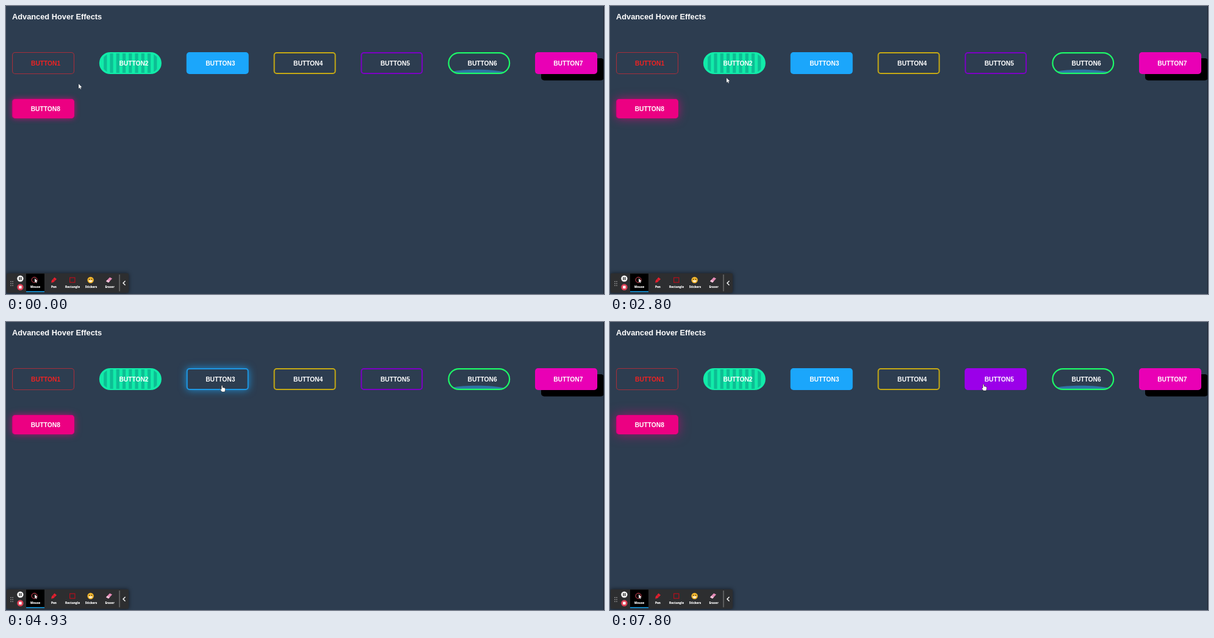
An HTML page with a canvas that plays this animation: 980x474 px, repeating every 8 s.

```html
<!DOCTYPE html>
<html lang="en">
<head>
<meta charset="utf-8">
<title>Advanced Hover Effects</title>
<style>
  html, body { margin: 0; width: 100%; height: 100%; overflow: hidden; background: #2d3d50; }
  canvas { display: block; width: 980px; height: 474px; }
</style>
</head>
<body>
<canvas id="stage"></canvas>
<script>
const W = 980, H = 474, LOOP = 8000, FADE = 300;
const BG = '#2d3d50', SANS = '"Liberation Sans", Arial, sans-serif';
const canvas = document.getElementById('stage');
const ctx = canvas.getContext('2d');
const ratio = window.devicePixelRatio || 1;
canvas.width = W * ratio;
canvas.height = H * ratio;

// Pointer path: time, x, y
const PATH = [
  [0, 119, 128], [350, 119, 128], [800, 93, 103], [1130, 91, 100], [1550, 91, 100],
  [1950, 127, 127], [2060, 128, 128], [2500, 150, 136], [2950, 205, 112],
  [3250, 212, 101], [3600, 215, 98], [3950, 220, 102], [4300, 285, 132],
  [4650, 349, 108], [4930, 354, 104], [5250, 356, 106], [5550, 420, 137],
  [5950, 488, 100], [6200, 492, 96], [6550, 492, 96], [7050, 550, 134],
  [7450, 606, 106], [7800, 612, 102], [8000, 612, 102]
];

// Time spans in which buttons 1 to 5 are hovered
const HOVERS = [[550, 1750], [2950, 4080], [4580, 5350], [5800, 6750], [7330, 9000]];

const clamp = v => Math.max(0, Math.min(1, v));
const smooth = v => v * v * (3 - 2 * v);
const left = i => 10 + 142.85 * i;

function hover(i, t) {
  const [start, end] = HOVERS[i];
  return smooth(clamp((t - start) / FADE)) * (1 - smooth(clamp((t - end) / FADE)));
}

function pointerAt(t) {
  const i = PATH.findIndex(p => p[0] > t);
  const a = PATH[i - 1], b = PATH[i];
  const k = smooth((t - a[0]) / (b[0] - a[0]));
  return [a[1] + (b[1] - a[1]) * k, a[2] + (b[2] - a[2]) * k];
}

function rounded(x, y, w, h, r) {
  ctx.beginPath();
  ctx.roundRect(x, y, w, h, r);
}

function fillBox(x, y, w, h, r, color, alpha = 1) {
  ctx.save();
  ctx.globalAlpha = alpha;
  ctx.fillStyle = color;
  rounded(x, y, w, h, r);
  ctx.fill();
  ctx.restore();
}

function border(x, y, w, h, r, color, width) {
  ctx.strokeStyle = color;
  ctx.lineWidth = width;
  rounded(x + width / 2, y + width / 2, w - width, h - width, Math.max(0, r - width / 2));
  ctx.stroke();
}

function shape(points, color) {
  ctx.fillStyle = color;
  ctx.beginPath();
  points.forEach(p => ctx.lineTo(...p));
  ctx.closePath();
  ctx.fill();
}

function disc(x, y, r, color) {
  ctx.fillStyle = color;
  ctx.beginPath();
  ctx.arc(x, y, r, 0, 7);
  ctx.fill();
}

function line(points, color, width) {
  ctx.strokeStyle = color;
  ctx.lineWidth = width;
  ctx.beginPath();
  points.forEach(p => ctx.lineTo(...p));
  ctx.stroke();
}

function text(value, x, y, font, color = '#fff', align = 'left') {
  ctx.font = font;
  ctx.fillStyle = color;
  ctx.textAlign = align;
  ctx.fillText(value, x, y);
}

const label = (n, x, color, y = 97.6) => text('BUTTON' + n, x, y, 'bold 10.24px ' + SANS, color);

function glow(x, y, w, h, r, color, blur, alpha) {
  ctx.save();
  ctx.globalAlpha = alpha;
  ctx.shadowColor = color;
  ctx.shadowBlur = blur * ratio;
  ctx.fillStyle = color;
  rounded(x, y, w, h, r);
  ctx.fill();
  ctx.restore();
}

function stripedButton(x, h) {
  fillBox(x, 76, 102, 36, 18, '#12eba9');
  ctx.save();
  rounded(x + 4, 78, 94, 32, 16);
  ctx.clip();
  ctx.fillStyle = '#0dbd94';
  for (let i = 0; i < 9; i++) ctx.fillRect(x + 7.3 + i * 10.25 - 2.5 * h, 78, 5.2, 32);
  ctx.restore();
}

function waveButton(x) {
  ctx.save();
  rounded(x + 1, 77, 100, 34, 17);
  ctx.clip();
  ctx.fillStyle = '#2f73a6';
  ctx.beginPath();
  ctx.moveTo(x + 7, 108);
  ctx.bezierCurveTo(x + 25, 103.5, x + 72, 103.5, x + 96, 109);
  ctx.lineTo(x + 96, 114);
  ctx.lineTo(x + 7, 114);
  ctx.fill();
  ctx.restore();
  border(x, 76, 102, 36, 18, '#1df968', 2.2);
}

function pulseButton(t) {
  const phase = (t % 1200) / 1200;
  glow(10, 153, 102, 32, 5, '#ea0080', 10 + 18 * phase, 0.75 - 0.35 * phase);
  fillBox(10, 153, 102, 32, 5, '#d2007a');
  fillBox(11.5, 153.5, 100, 31, 4.5, '#ec0082');
  label(8, 40.7, '#fff', 172.6);
}

function buttons(t) {
  const h = HOVERS.map((_, i) => hover(i, t));

  border(10, 76, 102, 36, 5, '#a52f3b', 1.1);
  fillBox(10, 76, 102, 36, 5, '#f02228', h[0]);
  const mix = Math.round(34 + 221 * h[0]);
  label(1, 41, `rgb(240,${mix},${mix})`);

  stripedButton(left(1), h[1]);
  label(2, 185.4, '#fff');

  const x3 = left(2);
  glow(x3, 76, 102, 36, 5, '#1ba5fa', 13, 0.75 * h[2]);
  fillBox(x3, 76, 102, 36, 5, BG, h[2]);
  fillBox(x3, 76, 102, 36, 5, '#1ba6fb', 1 - h[2]);
  if (h[2] > 0) border(x3, 76, 102, 36, 5, '#1e97e3', 2);
  label(3, 327.2, '#fff');

  border(left(3), 76, 102, 36, 5, '#c5a914', 2);
  fillBox(left(3), 76, 102, 36, 5, '#f8d719', h[3]);
  label(4, 471, '#fff');

  border(left(4), 76, 101.5, 36, 5, '#7c00c5', 2);
  fillBox(left(4), 76, 101.5, 36, 5, '#9b00e9', h[4]);
  label(5, 613.7, '#fff');

  waveButton(left(5));
  label(6, 756.5, '#fff');

  fillBox(877, 86, 103, 36.5, 5, '#000');
  fillBox(867, 76, 102, 36, 5, '#e900b5');
  label(7, 897.2, '#fff');

  pulseButton(t);
}

function toolIcons() {
  ctx.strokeStyle = '#e64a5c';
  ctx.lineWidth = 1;
  ctx.beginPath();
  ctx.arc(46.5, 450.8, 4.5, 0, 7);
  ctx.stroke();
  arrow(47, 448, 0.9);

  shape([[74, 455.5], [75, 451.5], [79.5, 446.5], [83, 449.5], [78, 454.5]], '#e3202f');
  line([[77, 449.5], [80.2, 452.4]], '#8d1822', 0.8);

  border(104, 446.5, 9.5, 9, 0, '#b30f1c', 1.2);

  disc(138.6, 451, 5.2, '#f2b62d');
  disc(136.6, 449.8, 0.9, '#4c3517');
  disc(140.5, 449.8, 0.9, '#4c3517');
  ctx.fillStyle = '#fff3df';
  ctx.beginPath();
  ctx.arc(138.6, 451.6, 2.9, 0, Math.PI);
  ctx.fill();

  shape([[164, 453], [170, 446.5], [174, 448.5], [168, 455.3]], '#e58bb7');
  shape([[164, 453], [166, 450.8], [170, 453], [168, 455.3]], '#f3c6da');
}

function toolbar() {
  ctx.save();
  ctx.shadowColor = 'rgba(0,0,0,.6)';
  ctx.shadowBlur = 6 * ratio;
  fillBox(1, 440, 200, 32, 2, '#2d2e30');
  ctx.restore();

  for (let i = 0; i < 6; i++) disc(8 + (i % 2) * 3, 453.5 + (i >> 1) * 3.3, 0.75, '#c4c4c4');

  disc(23.4, 448.6, 5.2, '#f5f5f5');
  ctx.fillStyle = '#222';
  ctx.fillRect(21.4, 446.2, 1.4, 4.8);
  ctx.fillRect(24, 446.2, 1.4, 4.8);
  disc(23.4, 462.7, 5.2, '#dd3f55');
  fillBox(21.2, 460.5, 4.4, 4.4, 0.7, '#fff');

  ctx.fillStyle = '#000';
  ctx.fillRect(33, 440.5, 30, 30.5);
  ctx.fillStyle = '#1697dc';
  ctx.fillRect(33, 469.3, 30, 1.7);

  ['Mouse', 'Pen', 'Rectangle', 'Stickers', 'Eraser'].forEach((name, i) =>
    text(name, 48 + i * 30.5, 464.4, '800 4.7px "Open Sans", sans-serif', '#fff', 'center'));
  toolIcons();

  line([[186, 442], [186, 469.5]], '#8a8a8a', 1);
  line([[195.5, 452.5], [192, 456], [195.5, 459.5]], '#fff', 1.4);
}

function arrow(x, y, size = 1) {
  const points = [[0, 0], [0, 8], [1.8, 6.4], [3, 9], [4.3, 8.4], [3.1, 5.9], [5.5, 5.7]]
    .map(([px, py]) => [x + px * size, y + py * size]);
  shape(points, '#fff');
  line([...points, points[0]], 'rgba(0,0,0,.5)', 0.4);
}

function hand(x, y) {
  ctx.save();
  ctx.translate(x, y);
  const outline = new Path2D(
    'M-1 1Q0-.5 1 1V4Q2 3.2 2.7 4.2Q3.7 3.7 4.2 4.7Q5.4 4.4 5.4 5.8V8L4.5 11H-.2L-2.8 7.5Q-3 6-1 6.6Z');
  ctx.fillStyle = '#fff';
  ctx.strokeStyle = 'rgba(20,20,20,.75)';
  ctx.lineWidth = 0.7;
  ctx.fill(outline);
  ctx.stroke(outline);
  ctx.restore();
}

function draw(t) {
  ctx.setTransform(ratio, 0, 0, ratio, 0, 0);
  ctx.fillStyle = BG;
  ctx.fillRect(0, 0, W, H);
  text('Advanced Hover Effects', 10, 21.8, 'bold 12.8px ' + SANS);
  buttons(t);
  ctx.fillStyle = '#1a232e';
  ctx.fillRect(979, 0, 1, H);
  toolbar();

  const [x, y] = pointerAt(t);
  const over = HOVERS.some((_, i) => x >= left(i) && x <= left(i) + 102 && y >= 76 && y <= 112);
  (over ? hand : arrow)(x, y);
}

const begin = performance.now();
function frame() {
  draw((performance.now() - begin) % LOOP);
  requestAnimationFrame(frame);
}
frame();
</script>
</body>
</html>
```
